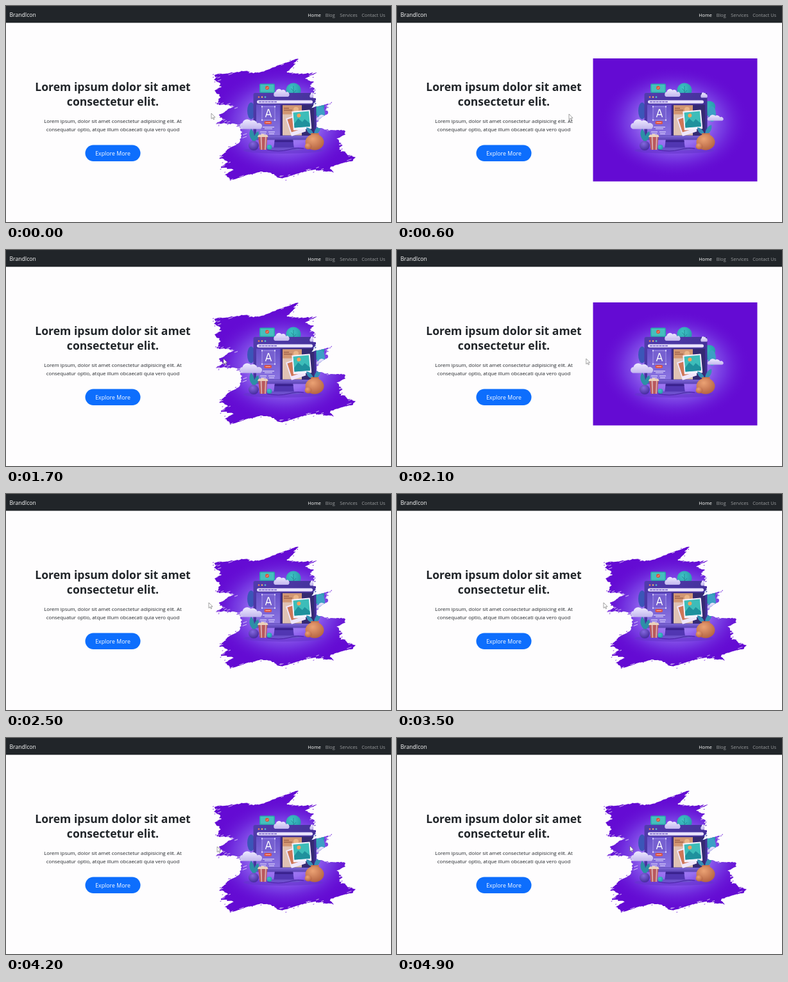
Recreate the animation shown at these times as an HTML page. Size 600 by 338 pixels, loop 5 s.

```html
<!DOCTYPE html>
<html lang="en">
<head>
<meta charset="utf-8">
<title>Landing page</title>
<style>
html, body { margin: 0; width: 100%; height: 100%; overflow: hidden; background: #fefdfe; }
svg { display: block; width: 100vw; height: 100vh; }
text { font-family: "Open Sans", "Noto Sans", sans-serif; fill: #212529; }
.nav text { font-size: 7.25px; fill: #9b9d9f; }
.nav .brand { font-size: 8.65px; fill: #fff; }
.nav .on { fill: #fff; }
.mid { text-anchor: middle; }
.head { font-size: 17.6px; font-weight: 700; }
.copy { font-size: 7.88px; }
.mid .btn { font-size: 8.8px; fill: #fff; }

/* the plain picture shows while the pointer is left of it */
#full { animation: bare 5s step-end infinite; }
#pointer { animation: roam 5s linear infinite; }
@keyframes bare {
  0%, 22%, 50%, 64%, 82%, 100% { opacity: 0; }
  4%, 40%, 54%, 74% { opacity: 1; }
}
@keyframes roam {
  0%   { transform: translate(320px, 168px); }
  2%   { transform: translate(314px, 168px); }
  4%   { transform: translate(302px, 169px); }
  12%  { transform: translate(268px, 169px); }
  16%  { transform: translate(262px, 170px); }
  20%  { transform: translate(294px, 170px); }
  22%  { transform: translate(312px, 170px); }
  26%  { transform: translate(332px, 170px); }
  34%  { transform: translate(339px, 170px); }
  38%  { transform: translate(318px, 170px); }
  40%  { transform: translate(302px, 170px); }
  45%  { transform: translate(284px, 170px); }
  48%  { transform: translate(300px, 170px); }
  50%  { transform: translate(316px, 170px); }
  52%  { transform: translate(314px, 170px); }
  54%  { transform: translate(300px, 170px); }
  59%  { transform: translate(282px, 170px); }
  62%  { transform: translate(296px, 170px); }
  64%  { transform: translate(312px, 170px); }
  70%  { transform: translate(322px, 170px); }
  72%  { transform: translate(314px, 170px); }
  74%  { transform: translate(300px, 170px); }
  78%  { transform: translate(284px, 170px); }
  80%  { transform: translate(296px, 170px); }
  82%  { transform: translate(318px, 170px); }
  86%  { transform: translate(340px, 170px); }
  96%, 100% { transform: translate(363px, 169px); }
}
</style>
</head>
<body>
<svg viewBox="0 0 600 338" preserveAspectRatio="none">
  <defs>
    <radialGradient id="glow">
      <stop offset="0" stop-color="#b79cfa"/>
      <stop offset=".42" stop-color="#9c78f3" stop-opacity=".92"/>
      <stop offset=".66" stop-color="#7d4ce8" stop-opacity=".65"/>
      <stop offset="1" stop-color="#640bd3" stop-opacity="0"/>
    </radialGradient>
    <linearGradient id="shell" x2="1" y2="1">
      <stop offset="0" stop-color="#523cae"/><stop offset="1" stop-color="#3b2a8c"/>
    </linearGradient>
    <linearGradient id="panel" x2="0" y2="1">
      <stop offset="0" stop-color="#6650c8"/><stop offset="1" stop-color="#8b74e2"/>
    </linearGradient>
    <linearGradient id="chin" x2="0" y2="1">
      <stop offset="0" stop-color="#7c66d6"/><stop offset="1" stop-color="#5a43b4"/>
    </linearGradient>
    <radialGradient id="clay" cx=".4" cy=".3" r=".75">
      <stop offset="0" stop-color="#eba274"/><stop offset="1" stop-color="#b2603f"/>
    </radialGradient>
    <radialGradient id="plum" cx=".4" cy=".3" r=".75">
      <stop offset="0" stop-color="#8468de"/><stop offset="1" stop-color="#41289a"/>
    </radialGradient>
    <radialGradient id="leaf" cx=".4" cy=".35" r=".75">
      <stop offset="0" stop-color="#3fc4c4"/><stop offset="1" stop-color="#2394a8"/>
    </radialGradient>
    <linearGradient id="cloudFill" x2="0" y2="1">
      <stop offset="0" stop-color="#efeaff"/><stop offset="1" stop-color="#c2b6ee"/>
    </linearGradient>
    <path id="cloud" fill="url(#cloudFill)" d="M4 14a4.3 4.3 0 0 1 1-8.4A7 7 0 0 1 17 2.6a6 6 0 0 1 9 3.4 4 4 0 0 1 4.5 8z"/>
    <clipPath id="brush"><path id="edge"/></clipPath>

    <g id="art">
      <rect x="305.5" y="82" width="256" height="192.5" fill="#640bd3"/>
      <ellipse cx="433" cy="182" rx="118" ry="88" fill="url(#glow)"/>
      <ellipse cx="432" cy="226" rx="62" ry="5" fill="#6535cc" opacity=".6"/>

      <!-- trees behind the screen -->
      <g fill="url(#leaf)">
        <circle cx="448" cy="132" r="11.5"/>
        <ellipse cx="382" cy="164" rx="6" ry="13" fill="#3b56b8"/>
        <ellipse cx="481" cy="161" rx="16" ry="11" transform="rotate(-28 481 161)"/>
        <ellipse cx="491" cy="169" rx="6" ry="12" fill="#3c9fc4"/>
        <ellipse cx="476" cy="187" rx="7" ry="16" fill="#3f62bd"/>
      </g>
      <path d="M448 125v20m0-12l-4-4m4 7l4-4M482 152l-4 36" fill="none" stroke="#24828f" stroke-width=".8"/>
      <rect x="395" y="121.5" width="24" height="14.5" rx="2" fill="#2ba3aa"/>
      <rect x="396.500" y="123" width="21" height="11.5" rx="1" fill="#45bfbd"/>
      <circle cx="407" cy="128" r="3" fill="#d9543f"/>
      <path d="M405.5 128l1.2 1.2 2-2.5" fill="none" stroke="#ffd7b5" stroke-width=".7"/>

      <!-- screen -->
      <path d="M419 208h28l2 15h-32z" fill="#5136b2"/>
      <path d="M419 208h28l.6 5h-29z" fill="#3b2390"/>
      <rect x="408" y="221.5" width="50" height="4" rx="2" fill="#6c50cc"/>
      <rect x="385.5" y="136" width="98" height="73" rx="3" fill="url(#shell)"/>
      <path d="M385.5 203h98v4a2.5 2.5 0 0 1-2.5 2.5h-93a2.5 2.5 0 0 1-2.500-2.500z" fill="url(#chin)"/>
      <g fill="#f0805a">
        <circle cx="394" cy="142.500" r="1.3"/><circle cx="399" cy="142.500" r="1.3" fill="#f3b56e"/>
        <circle cx="404" cy="142.500" r="1.3" fill="#56c8cf"/>
      </g>
      <path d="M476 141.5h5" stroke="#a896ea" stroke-width="1.2"/>
      <rect x="391" y="147.5" width="87" height="5" rx="2.5" fill="#e9e3ff"/>
      <path d="M394 150h28" stroke="#6e56c4" stroke-width="1.3" stroke-dasharray="4 .8"/>
      <rect x="390" y="154.5" width="37" height="48" fill="url(#panel)"/>
      <rect x="399" y="157.5" width="20" height="21" fill="#7660d0" stroke="#b7a8f2" stroke-width=".7"/>
      <path d="M404.500 174l4-12h1l4 12m-7.500-4h6" fill="none" stroke="#fff" stroke-width="1.3"/>
      <g fill="#e9e2ff">
        <rect x="398" y="156.5" width="2" height="2"/><rect x="418" y="156.5" width="2" height="2"/>
        <rect x="398" y="177.5" width="2" height="2"/><rect x="418" y="177.5" width="2" height="2"/>
      </g>
      <rect x="402.5" y="180" width="11.5" height="5" rx="2" fill="#dc5446"/>
      <path d="M404.5 182.5h7.5" stroke="#ffd5c4" stroke-width=".8"/>
      <path d="M400 189.5h18m-15 2.5h12M396 197h10m3 0h10m-22 3h8m5 0h8" stroke="#e9e2ff" stroke-width="1.2"/>
      <rect x="429" y="154.5" width="51" height="48" fill="#352a72"/>
      <rect x="431" y="155.5" width="30" height="47" fill="#dfc2b4"/>
      <path d="M431 155.5h30v14h-30z" fill="#d29672"/>
      <path d="M433 160h8m-8 3h13" stroke="#8b4c38" stroke-width="1"/>
      <circle cx="452" cy="162" r="4" fill="#eab588"/>

      <!-- loose photos -->
      <g transform="rotate(-18 451 187)">
        <rect x="440" y="172" width="24" height="29" rx="1" fill="#efe6fb"/>
        <rect x="442" y="174" width="20" height="21" fill="#cf7658"/>
      </g>
      <g transform="rotate(-5 461 178)">
        <rect x="446.5" y="163.5" width="28.5" height="30" rx="1" fill="#f6f2ff"/>
        <rect x="448.5" y="165.5" width="24.5" height="24" fill="#3dbdb9"/>
        <path d="M448.5 189.5v-6l7-8 6 6 4-4 7.5 7v5z" fill="#1f919d"/>
        <circle cx="457" cy="171" r="3" fill="#f3a15c"/>
      </g>

      <!-- clouds -->
      <use href="#cloud" transform="translate(363 177) scale(1.1)"/>
      <use href="#cloud" transform="translate(416.5 129.5) scale(.76 .9)"/>
      <use href="#cloud" transform="translate(473 135) scale(.33 .6)"/>
      <use href="#cloud" transform="translate(483 170) scale(.78 .68)"/>

      <!-- things on the desk -->
      <path d="M386 213c-8-8-8-15-4-21 5 5 6 12 4 21 0-9 2-14 7-17 3 7-1 13-7 17" fill="#2c8fa6"/>
      <ellipse cx="386" cy="218.5" rx="8" ry="7.5" fill="url(#plum)"/>
      <path d="M393 204h14.500l-2 21h-10z" fill="#b9585c"/>
      <path d="M396.500 205l1 20h1.600l-.4-20m5.200 0l-.8 20h1.600l1-20" fill="#d9aeb0"/>
      <path d="M392 205q1-5 5-3.500 3-3 6 0 5-1.500 5.500 3.500z" fill="#ecd2bb"/>
      <circle cx="410.5" cy="221" r="4" fill="url(#leaf)"/>
      <path d="M407 225q18 4 33 0t24-2" fill="none" stroke="#4522a0" stroke-width="1"/>
      <path d="M480 202c-3-9-8-12-12-12 0 6 4 11 12 12 0-8 5-15 10-16 2 7-3 14-10 16" fill="#358fb5"/>
      <path d="M475 199h13l-1 5h-11z" fill="#c9744c"/>
      <ellipse cx="481" cy="213" rx="14.5" ry="12.5" fill="url(#clay)"/>
      <ellipse cx="471" cy="219.5" rx="5.5" ry="5" fill="url(#clay)"/>
    </g>
  </defs>

  <rect width="600" height="338" fill="#fefdfe"/>
  <g class="nav">
    <rect width="600" height="26.3" fill="#212529"/>
    <text class="brand" x="5.5" y="16.8">BrandIcon</text>
    <text class="on" x="470.2" y="16.5">Home</text>
    <text x="497.8" y="16.5">Blog</text>
    <text x="520.3" y="16.5">Services</text>
    <text x="554.3" y="16.5">Contact Us</text>
  </g>
  <g class="mid">
    <text class="head" x="166.5" y="133">Lorem ipsum dolor sit amet</text>
    <text class="head" x="166.5" y="155.5">consectetur elit.</text>
    <text class="copy" x="166.5" y="183.2">Lorem ipsum, dolor sit amet consectetur adipisicing elit. At</text>
    <text class="copy" x="166.5" y="195.8">consequatur optio, atque illum obcaecati quia vero quod</text>
    <rect x="123.5" y="217.5" width="86" height="25.5" rx="12.75" fill="#0d6efd"/>
    <text class="btn" x="166.5" y="233.5">Explore More</text>
  </g>

  <use href="#art" clip-path="url(#brush)"/>
  <path id="streaks" stroke="#fefdfe" stroke-width=".7" fill="none"/>
  <use id="full" href="#art"/>
  <path id="pointer" d="M0 0v8.500l2-1.800 1.400 3 1.300-.6-1.400-2.900h2.700z" fill="#fff" stroke="#444" stroke-width=".5"/>
</svg>
<script>
const outline = [
  [325,107], [345,105], [372,102], [384,105], [400,103], [422,94], [455,82],
  [448,93], [438,104], [462,106], [484,105], [466,113], [480,119], [474,124],
  [481,130], [478,138], [483,147], [475,160], [490,156], [504,153], [497,163],
  [502,168], [490,176], [484,182], [486,190], [500,195], [527,194], [529,201],
  [515,208], [523,217], [519,225], [543,236], [541,242], [524,246], [506,252],
  [511,260], [480,256], [462,260], [446,265], [430,270], [418,263], [397,259],
  [375,265], [349,273], [342,264], [355,256], [335,252], [346,244], [333,237],
  [347,223], [362,215], [366,205], [366,191], [355,184], [327,184], [340,177],
  [332,171], [354,157], [328,153], [334,142], [325,132], [336,126], [327,117]
];
const along = [.94, -.34];  // brush direction
let seed = 11;
const rand = () => (seed = seed * 16807 % 2147483647) / 2147483647;
const spread = n => (rand() - .5) * 2 * n;
const at = (x, y) => x.toFixed(1) + " " + y.toFixed(1);

let edge = "", streaks = "", specks = "";
outline.forEach(([x, y], i) => {
  const [nx, ny] = outline[(i + 1) % outline.length];
  const n = Math.max(2, Math.round(Math.hypot(nx - x, ny - y) / 2.2));
  for (let k = 0; k < n; k++) {
    const px = x + (nx - x) * k / n, py = y + (ny - y) * k / n;
    const push = k ? spread(2.8) : 0;
    edge += (edge ? "L" : "M") + at(px + along[0] * push, py + along[1] * push + spread(.5));
    if (rand() < .15) {
      const off = spread(4), len = 3 + rand() * 5;
      streaks += "M" + at(px + off, py + spread(3)) + "l" + at(along[0] * len, along[1] * len);
    }
    if (rand() < .15) {
      specks += "M" + at(px + spread(5), py + spread(4)) + "l1.7-.6.4.7-1.7.6z";
    }
  }
});
document.getElementById("edge").setAttribute("d", edge + "z" + specks);
document.getElementById("streaks").setAttribute("d", streaks);
</script>
</body>
</html>
```
